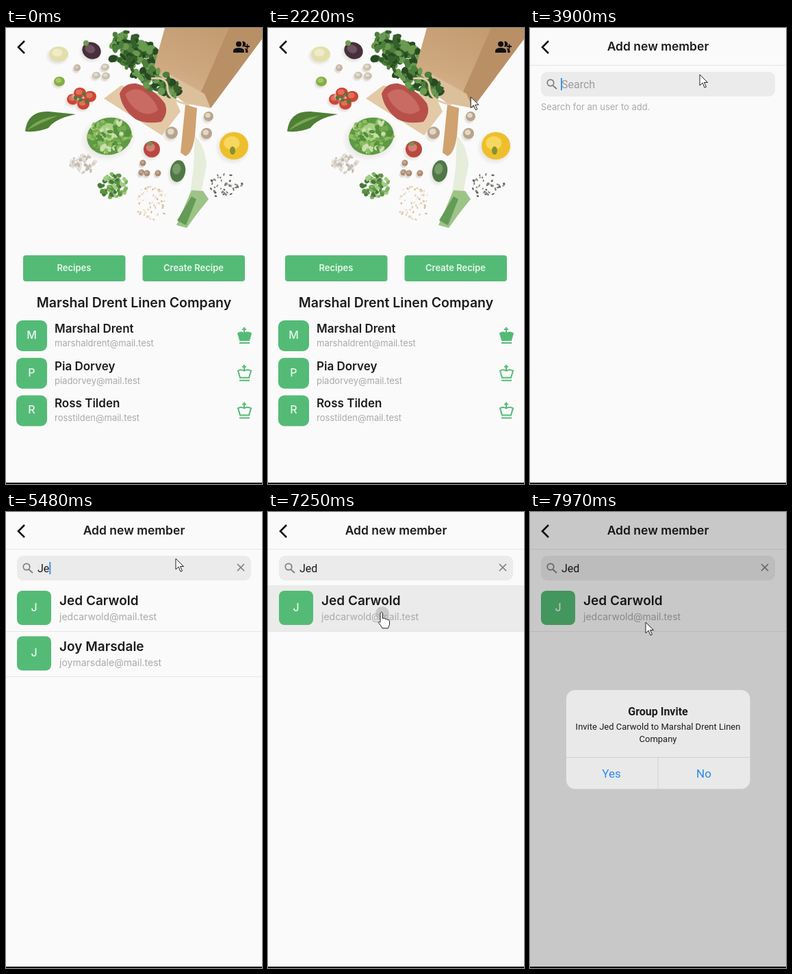
An HTML page for the animation above (7990 ms loop, 374 by 666 pixels).

```html
<!DOCTYPE html>
<html lang="en">
<head>
<meta charset="utf-8">
<title>Add a group member</title>
<style>
html, body { margin: 0; width: 100%; height: 100%; overflow: hidden; background: #fafafa; }
svg { display: block; width: 100%; height: 100%; }
text { font-family: Inter, "Open Sans", sans-serif; fill: #1c1c1c; }
.mid { text-anchor: middle; }
.bold { font-weight: 600; }
.green { fill: #54bb76; }
.pale { fill: #e9f7ee; }
.mail { fill: #aaa; }
.ui { font-family: Roboto, sans-serif; }
.line { stroke: #e6e6e6; fill: none; }
.icon { fill: none; stroke: #7d7d7d; stroke-width: 1.7; }
.blue { fill: #2b8af0; font-size: 17px; }
</style>
</head>
<body>
<svg viewBox="0 0 374 666" preserveAspectRatio="none">
  <defs>
    <path id="back" d="M27 19l-9 9 9 9" fill="none" stroke="#111" stroke-width="2.6"/>
    <g id="crown" stroke="#54bb76" stroke-width="2">
      <path d="M348 446q-5-3-9 0l3 10h13l3-10q-5-3-10 0z"/>
      <path d="M348 437v9M345 440h6M341 460h15" fill="none"/>
    </g>
    <clipPath id="row"><path d="M0 107h374v67H0z"/></clipPath>
    <linearGradient id="paper" x1=".8" y1="0" x2=".3" y2="1">
      <stop stop-color="#c29a70"/><stop offset=".6" stop-color="#cda77e"/><stop offset="1" stop-color="#d8b892"/>
    </linearGradient>
    <radialGradient id="glow">
      <stop offset=".5" stop-color="#ddd9d4"/><stop offset="1" stop-color="#ddd9d4" stop-opacity="0"/>
    </radialGradient>
  </defs>

  <g id="home">
    <path d="M0 0h374v666H0z" fill="#fafafa"/>
    <g id="photo"></g>
    <circle id="hover" cx="344" cy="28" r="26" opacity="0"/>
    <use href="#back"/>
    <g fill="#111">
      <circle cx="340" cy="23.5" r="4"/>
      <path d="M332 36v-2.5q0-4.500 8-4.500t8 4.500V36zM345 19.700a4 4 0 1 1 0 7.600q2-4 0-7.600zM348.500 29.200q5 1 5 4.300V36h-3.500v-2.500q0-2.500-1.500-4.300z"/>
      <path d="M352.500 23.500v7M349 27h7" stroke="#111" stroke-width="1.800"/>
    </g>
    <rect class="green" x="25" y="332" width="149.500" height="38" rx="4"/>
    <rect class="green" x="199.500" y="332" width="149.500" height="38" rx="4"/>
    <text class="mid bold pale" x="99.500" y="355" font-size="13">Recipes</text>
    <text class="mid bold pale" x="274" y="355" font-size="13">Create Recipe</text>
    <text class="mid bold" x="187" y="408" font-size="19.500">Marshal Drent Linen Company</text>
    <g id="members"></g>
  </g>

  <g id="add">
    <path d="M0 0h374v666H0z" fill="#fafafa"/>
    <use href="#back"/>
    <text class="mid bold" x="187" y="33" font-size="17.500">Add new member</text>
    <path class="line" d="M0 54.500h374"/>
    <rect x="16" y="64" width="342" height="36" rx="9" fill="#ebebeb"/>
    <path class="icon" d="M33.500 84l5.500 5"/>
    <circle class="icon" cx="30" cy="80" r="4.700"/>
    <path id="clear" class="icon" d="M338 76l10 10m0-10l-10 10"/>
    <text id="query" class="ui" x="46" y="87.500" font-size="16"></text>
    <rect id="caret" y="73" width="2" height="18" fill="#3f93e6"/>
    <text id="hint" class="mail" x="16" y="120" font-size="13">Search for an user to add.</text>
    <g id="press" clip-path="url(#row)">
      <path d="M0 107h374v67H0z" fill="#ebebeb"/>
      <circle id="ripple" cx="167" cy="148" fill="#999" opacity=".4"/>
    </g>
    <g id="found"></g>
  </g>

  <path id="shade" d="M0 0h374v666H0z" opacity="0"/>
  <g id="dialog">
    <rect x="53" y="260" width="268.500" height="144.500" rx="13" fill="#e9e9e9"/>
    <text class="mid ui" x="187" y="297" font-size="16" font-weight="700">Group Invite</text>
    <text class="mid ui" x="187" y="318" font-size="13">Invite Jed Carwold to Marshal Drent Linen</text>
    <text class="mid ui" x="187" y="336" font-size="13">Company</text>
    <path d="M53 358.500h268.500M187 358.500v46" stroke="#d0d0d0"/>
    <text class="mid ui blue" x="119" y="388">Yes</text>
    <text class="mid ui blue" x="254" y="388">No</text>
  </g>
  <path d="M0 664h374v2H0z"/>
  <path id="cursor" fill="#fff" stroke="#222" stroke-linejoin="round"/>
</svg>

<script>
const LOOP = 7990;
const $ = id => document.getElementById(id);
const set = (id, name, value) => $(id).setAttribute(name, value);
const show = (id, on) => set(id, 'visibility', on ? 'visible' : 'hidden');
const part = (t, a, b) => Math.min(1, Math.max(0, (t - a) / (b - a)));

// Produce picture in flat shapes
let seed = 7;
const rnd = () => (seed = seed * 16807 % 2147483647) / 2147483647;
const oval = (fill, x, y, rx, ry = rx, turn = 0) =>
  `<ellipse cx="${x}" cy="${y}" rx="${rx}" ry="${ry}" fill="${fill}" transform="rotate(${turn} ${x} ${y})"/>`;
const lit = (dark, light, x, y, rx, ry = rx, turn = 0) =>
  oval('url(#glow)', x - 2, y + 3, rx * 1.25, ry * 1.25, turn) + oval(dark, x, y, rx, ry, turn) +
  oval(light, x - rx * .15, y - ry * .2, rx * .55, ry * .5, turn);
const shape = (fill, d) => `<path d="${d}" fill="${fill}"/>`;
function scatter(count, colors, x, y, rx, ry, size, turn = 0) {
  let out = '';
  for (let i = 0; i < count; i++) {
    const a = rnd() * 6.283, r = Math.sqrt(rnd());
    out += oval(colors[i % colors.length], x + rx * r * Math.cos(a), y + ry * r * Math.sin(a),
      size * (.6 + rnd() * .6), size * (.4 + rnd() * .5), rnd() * 180);
  }
  return `<g transform="rotate(${turn} ${x} ${y})">${out}</g>`;
}
const leaves = ['#35602c', '#4c7f3b', '#284a22', '#6a9a50'];
$('photo').innerHTML =
  shape('#e3c9a6', 'M143 103L168 84 245 100 255 122 228 157z') +
  shape('#b8504a', 'M166 96Q172 80 190 81 216 88 232 110 238 124 227 137 204 141 189 133 169 118 166 96z') +
  shape('#c96b63', 'M174 97Q184 86 198 91 218 103 222 120 211 129 196 123 180 114 174 97z') +
  scatter(150, leaves, 204, 53, 63, 24, 6, 47) +
  scatter(40, leaves, 178, 33, 26, 24, 6) +
  shape('url(#paper)', 'M232 0H374V16L299 117 236 88 212 72z') +
  shape('#b98f66', 'M326 0h48v16l-75 101-17-17z') +
  shape('#dcbf9b', 'M212 72L236 66 290 96 299 117 262 110z') +
  scatter(45, leaves, 226, 77, 34, 14, 6, 40) +
  `<path d="M212 74Q236 70 236 88T268 112" fill="none" stroke="#e2cba9" stroke-width="3"/>` +
  shape('#cfa270', 'M262 112L279 117 276 158Q272 184 262 187L255 182z') +
  lit('#5f9a45', '#a9cf83', 151, 158, 33, 27, -12) +
  scatter(90, ['#558f3c', '#8dbd63', '#c9e0ab', '#76ab4f'], 151, 158, 30, 24, 4.5) +
  [[98, 104], [108, 95], [123, 100], [113, 111]].map(([x, y]) => lit('#cd4534', '#e0705c', x, y, 9, 8)).join('') +
  scatter(6, ['#4d7a38'], 111, 102, 12, 8, 3) +
  lit('#e3dfab', '#efecc8', 77, 38, 14, 11) + lit('#46303c', '#6d5261', 125, 33, 14, 12, 25) + oval('#6f9a50', 117, 22, 4) +
  lit('#c3b2a0', '#d8cabc', 104, 58, 5) + lit('#84ad45', '#a5c76c', 78, 78, 8, 7) +
  [[145, 57], [146, 70], [132, 69]].map(([x, y]) => lit('#cabfae', '#e2dacd', x, y, 6, 5)).join('') +
  shape('#4e7f34', 'M28 151Q31 121 62 122L102 126Q72 132 62 146 45 153 28 151z') +
  shape('#7ba759', 'M31 149Q45 132 76 128 54 137 31 149z') +
  lit('#b9483f', '#d57f75', 213, 177, 12) + oval('#6e9350', 210, 169, 4, 3) +
  [[242, 153, 9], [293, 154, 8], [296, 129, 7]].map(([x, y, r]) => lit('#b7a48c', '#e2d6c6', x, y, r)).join('') +
  lit('#eebf2c', '#f6d75f', 333, 172, 21, 20) + oval('#87912f', 331, 179, 4, 6) +
  [[200, 197], [198, 211], [206, 212], [222, 212]].map(([x, y]) => lit('#ac8a70', '#c4a78f', x, y, 4.5)).join('') +
  lit('#4f7846', '#779a6a', 251, 209, 11, 16, 10) +
  shape('#e6eddb', 'M276 158Q290 170 293 200L284 246 268 248 274 205z') +
  shape('#9cc487', 'M271 237L288 238 296 250 280 270 264 292 249 288z') +
  shape('#639b57', 'M271 246L278 250 263 288 250 281z') +
  scatter(45, ['#d8d1c8', '#c4bbae', '#e6e1da'], 113, 198, 19, 13, 3) +
  scatter(60, ['#5b9441', '#7db45c', '#47793a', '#a3cb88'], 157, 231, 20, 18, 4) +
  scatter(55, ['#e3d3bb', '#ecdfca', '#d9c09c'], 212, 256, 23, 27, 1.9) +
  scatter(38, ['#66665f', '#8b8b84'], 322, 228, 27, 19, 2, -15);

const rowOf = (x, y, box, r, name, mail, gap, sizes) => `
  <rect class="green" x="${x}" y="${y}" width="${box}" height="${box}" rx="${r}"/>
  <text class="mid pale" x="${x + box / 2}" y="${y + box / 2 + 4.5}" font-size="16" font-weight="500">${name[0]}</text>
  <text class="bold" x="${x + box + gap}" y="${y + sizes[2]}" font-size="${sizes[0]}">${name}</text>
  <text class="mail" x="${x + box + gap}" y="${y + sizes[3]}" font-size="${sizes[1]}">${mail}@mail.test</text>`;

$('members').innerHTML = [['Marshal Drent', 'marshaldrent'], ['Pia Dorvey', 'piadorvey'], ['Ross Tilden', 'rosstilden']]
  .map(([name, mail], i) => rowOf(15, 427 + i * 54.7, 45, 9, name, mail, 11, [17, 13, 18, 38]) +
    `<use href="#crown" y="${i * 54.7}" fill="${i ? 'none' : '#54bb76'}"/>`).join('');

$('found').innerHTML = [['Jed Carwold', 'jedcarwold'], ['Joy Marsdale', 'joymarsdale']]
  .map(([name, mail], i) => `<g id="hit${i}">` +
    rowOf(16, 115 + i * 66.5, 50, 8, name, mail, 12, [19, 14, 21, 43]) +
    `<path class="line" d="M0 ${174.5 + i * 66}h374"/></g>`).join('');

// Pointer: time, x, y
const path = [
  [780, 376, 556], [1530, 222, 170], [1600, 222, 170], [2220, 296, 101], [2390, 341, 50],
  [2430, 341, 50], [2700, 352, 22], [3290, 352, 22], [3650, 259, 72], [3710, 259, 72],
  [3890, 248, 68], [6680, 248, 68], [7180, 166, 146], [7350, 166, 146], [7440, 169, 161]
];
const arrow = 'M0 0V16l4-4 3 7 2.500-1-3-6.500h5z';
const hand = 'M-2 1.500q2-3 3.500 0v8q3-1.500 3.500.8 3-1 3.500 1 3-.5 3 2v5q-1 3-2 5.500H1q-1-3-6-8.500 1-2.500 3 0z';

function pointer(t) {
  show('cursor', t >= 780);
  const next = path.findIndex(k => k[0] > t);
  const b = path[next < 0 ? path.length - 1 : next], a = path[Math.max(0, path.indexOf(b) - 1)];
  const p = part(t, a[0], b[0]);
  set('cursor', 'transform', `translate(${a[1] + (b[1] - a[1]) * p} ${a[2] + (b[2] - a[2]) * p})`);
  const overLink = t > 2500 && t < 3380 || t > 6940 && t < 7400;
  set('cursor', 'd', overLink ? hand : arrow);
}

function draw(t) {
  pointer(t);
  set('hover', 'opacity', .06 * part(t, 2470, 2560));

  const slide = 1 - part(t, 3000, 3420);
  set('add', 'transform', `translate(${374 * slide * slide} 0)`);
  show('add', t >= 3000);

  const typed = t < 4540 ? '' : t < 5480 ? 'J' : t < 5980 ? 'Je' : 'Jed';
  $('query').textContent = typed || 'Search';
  $('query').style.fill = typed ? '#1c1c1c' : '#9b9b9b';
  show('clear', t >= 4540);
  show('hint', t >= 3000 && t < 4540);
  show('caret', t >= 3880 && t < 6280);
  set('caret', 'x', typed ? 46 + $('query').getComputedTextLength() : 45);

  set('found', 'opacity', part(t, 5150, 5280));
  show('hit1', t >= 5150 && t < 6230);
  set('press', 'opacity', part(t, 6940, 7000) * (1 - part(t, 7330, 7450)));
  set('ripple', 'r', 10 * part(t, 7150, 7250) + 60 * part(t, 7310, 7450));

  const open = part(t, 7310, 7510), grow = 1 + .3 * (1 - open) ** 3;
  set('shade', 'opacity', .2 * open);
  set('dialog', 'opacity', open);
  set('dialog', 'transform', `translate(187 332) scale(${grow}) translate(-187 -332)`);
}

const start = performance.now();
function tick() {
  draw((performance.now() - start) % LOOP);
  requestAnimationFrame(tick);
}
tick();
</script>
</body>
</html>
```
